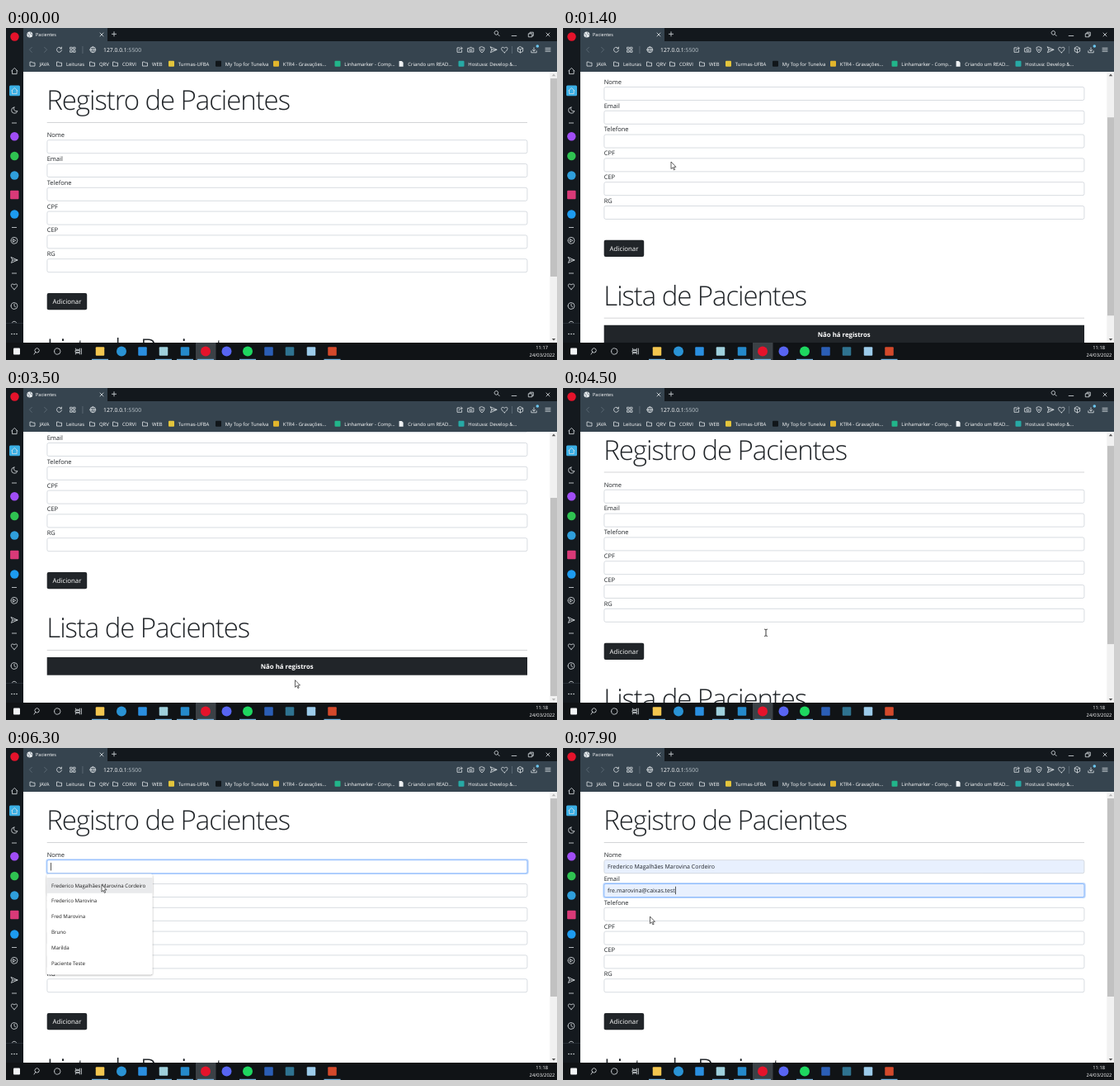
These frames come from a looping animation (668x402 px, 8000 ms). An HTML page:

```html
<!DOCTYPE html>
<html lang="pt-BR">
<head>
<meta charset="utf-8">
<title>Pacientes</title>
<style>
  html, body { margin: 0; width: 100%; height: 100%; overflow: hidden; background: #fff; }
  svg { display: block; width: 668px; height: 402px; }
  text { font-family: "Open Sans", "Noto Sans", sans-serif; text-rendering: geometricPrecision; white-space: pre; }
  .line { fill: none; stroke: #dde2e6; stroke-width: .8; stroke-linecap: round; stroke-linejoin: round; }
  .dim { stroke: #62707b; }
  .title { font-size: 33px; font-weight: 300; letter-spacing: -1.08px; }
  .label { font-size: 7.5px; }
  .value { font-size: 7px; }
  .option { font-size: 6.15px; font-weight: 500; }
  .medium { font-weight: 500; }
</style>
</head>
<body>
<svg id="stage" viewBox="0 0 668 402" xmlns="http://www.w3.org/2000/svg"></svg>
<script>
const LOOP = 8000;
const INK = '#212529';

const rect = (x, y, w, h, fill, extra = '') =>
  `<rect x="${x}" y="${y}" width="${w}" height="${h}" fill="${fill}" ${extra}/>`;
const disc = (x, y, r, fill) => `<circle cx="${x}" cy="${y}" r="${r}" fill="${fill}"/>`;
const square = (x, y, size, fill) => rect(x - size / 2, y - size / 2, size, size, fill, 'rx="1"');
const text = (x, y, str, size, fill, extra = '') =>
  `<text x="${x}" y="${y}" fill="${fill}" style="${size ? `font-size:${size}px` : ''}" ${extra}>${str}</text>`;
const icon = (x, y, d, extra = '') =>
  `<path class="line ${extra}" transform="translate(${x} ${y})" d="${d}"/>`;

const ring = r => `M${-r} 0a${r} ${r} 0 1 0 ${2 * r} 0a${r} ${r} 0 1 0 ${-2 * r} 0`;
const SHAPES = {
  house: 'M-3.6 0L0 -3.6L3.6 0M-2.8 -.6V3.6H2.8V-.6',
  moon: 'M-.4 -3.6A3.7 3.7 0 1 0 3.6 1A3.2 3.2 0 0 1 -.4 -3.6',
  send: 'M-3.6 -3.4L4 0L-3.6 3.4L-2.2 0ZM-2.2 0H4',
  heart: 'M0 3.4C-6 -.4 -3.8 -5 0 -2C3.8 -5 6 -.4 0 3.4Z',
  clock: ring(3.9) + 'M0 -2.2V.2L1.6 1.2',
  play: ring(3.9) + 'M-1.2 -1.7L1.7 0L-1.2 1.7Z',
  globe: ring(3.4) + 'M-3.4 0H3.4M0 -3.4C-2 -1 -2 1 0 3.4C2 1 2 -1 0 -3.4',
  cross: 'M-2 -2L2 2M2 -2L-2 2',
  lens: 'M1.1 .4a2.3 2.3 0 1 0 -3.4 0a2.3 2.3 0 0 0 3.4 0L3.2 2.6',
  folder: 'M-3 2.4V-2.2H-.6L.3 -1.2H3V2.4Z',
  sheet: 'M-2.4 -3.4H.8L2.6 -1.6V3.4H-2.4Z',
  grid: 'M-3 -3H-.8V-.8H-3ZM.8 -3H3V-.8H.8ZM-3 .8H-.8V3H-3ZM.8 .8H3V3H.8Z',
  reload: 'M2.6 -1.6A3 3 0 1 0 3 .6M2.9 -3.2V-1.3H1',
  cube: 'M0 -3.6L3.2 -1.9V1.9L0 3.6L-3.2 1.9V-1.9ZM-3.2 -1.9L0 -.2L3.2 -1.9M0 -.2V3.6',
  camera: 'M-3.4 -1.9H-1.5L-.9 -2.9H.9L1.5 -1.9H3.4V2.7H-3.4ZM-1.3 .4a1.3 1.3 0 1 0 2.6 0a1.3 1.3 0 1 0 -2.6 0',
  shield: 'M0 -3.5L3 -2.4C3 .6 2 2.5 0 3.5C-2 2.5 -3 .6 -3 -2.4ZM-1 -.8L1 1.2M1 -.8L-1 1.2',
  edit: 'M0 -2.4H-3V3H2.6V.6M-.8 .8C-.6 -1 .8 -1.8 3 -1.8M1.6 -3.2L3.2 -1.8L1.6 -.4',
  download: 'M0 -3V1.2M-1.7 -.4L0 1.3L1.7 -.4M-3.2 1V3H3.2V1',
  menu: 'M-3 -2H3M-3 0H3M-3 2H3',
  tasks: 'M-3.6 -3.4V-2.2H1.6V-3.4M-3.6 3.4V2.2H1.6V3.4M-3.6 -1H1.6V1H-3.6ZM3.4 -3.4V3.4',
};

/* ---------- browser frame ---------- */
function sidebar() {
  const s = SHAPES;
  const rule = y => icon(10, y, 'M-2.6 0H2.6');
  return rect(0, 0, 21, 381, '#14191e') + disc(10.5, 10.5, 5.2, '#e5132b') +
    icon(10.3, 52, s.house) + rect(4, 69.5, 13, 12.8, '#3aaee4', 'rx="1.5"') +
    icon(10.3, 76, s.house) + icon(10.3, 99.5, s.moon) + rule(115) +
    disc(10.3, 131.3, 5.2, '#a04df5') + disc(10.3, 155, 5.2, '#2fc351') +
    disc(10.3, 178.5, 5.2, '#2f9fdc') + square(10.3, 202, 10.4, '#d93a78') +
    disc(10.3, 225.5, 5.2, '#1d9bf0') + rule(241.5) +
    icon(10, 257.3, s.play) + icon(10, 281, s.send) + rule(297) +
    icon(10, 313, s.heart) + icon(10, 336.5, s.clock) +
    icon(10, 357, 'M-2.6 0C-2.4 -2.4 2.4 -2.4 2.6 0') + rect(0, 357, 21, .8, '#2b333a') +
    [7, 10, 13].map(x => disc(x, 370.5, .8, '#e4e8eb')).join('');
}

function topBar() {
  const s = SHAPES;
  const white = '#fff';
  return rect(21, 0, 647, 17, '#13181d') + rect(21, 0, 102, 18, '#36444f') +
    rect(21, 16, 647, 37, '#36444f') +
    disc(28.8, 8, 3.5, '#e9edf0') + icon(28.8, 8, 'M-3 -1C-1 -2 0 1 -1 3M1 -3C0 -1 2 0 3 .5', 'dim') +
    text(36, 10.2, 'Pacientes', 5.6, white, 'class="medium"') + icon(116, 8, s.cross) +
    icon(131, 7.3, 'M-2.6 0H2.6M0 -2.6V2.6') +
    icon(595, 7, s.lens) + icon(616, 9.5, 'M-2.8 0H2.8') +
    icon(636.5, 8, 'M-2.8 -1.2H1.4V2.8H-2.8ZM-1.4 -1.2V-2.8H2.8V1.4H1.4') + icon(657, 8, s.cross) +
    icon(30, 26.3, 'M1.4 -3L-1.6 0L1.4 3', 'dim') + icon(48, 26.3, 'M-1.4 -3L1.6 0L-1.4 3', 'dim') +
    icon(64.5, 26.3, s.reload) + icon(81, 26.3, s.grid) + rect(92.6, 22, .7, 9, '#66747e') +
    icon(105.3, 26.3, s.globe) +
    text(118, 28.8, '127.0.0.1<tspan fill="#bcc5cc">:5500</tspan>', 6.8, white, 'class="medium"') +
    icon(550, 26.3, s.edit) + icon(563.5, 26.3, s.camera) + icon(577, 26.3, s.shield) +
    icon(591, 26.3, s.send) + icon(604.3, 26.3, s.heart) + rect(613, 22, .7, 9, '#66747e') +
    icon(623.5, 26.3, s.cube) + icon(640, 26.8, s.download) + disc(644.3, 22, 1.8, '#6bc8f2') +
    icon(657, 26.3, s.menu);
}

function bookmarks() {
  const folders = [[32, 'JAVA'], [64.5, 'Leituras'], [104.5, 'QRV'], [132.5, 'CORVI'], [168.5, 'WEB']];
  const links = [
    [200.5, '#e3c53c', 'Turmas-UFBA'], [257.5, '#11161a', 'My Top for Tunelva'],
    [327.5, '#e2b52c', 'KTR4 - Gravações...'], [402, '#22b58a', 'Linhamarker - Comp...'],
    [479, '', 'Criando um READ...'], [552, '#27a9a5', 'Hostuva: Develop &amp;...'],
  ];
  const name = (x, str) => text(x, 45.6, str, 5.95, '#fff', 'class="medium"');
  return folders.map(([x, str]) => icon(x, 43.3, SHAPES.folder) + name(x + 8.4, str)).join('') +
    links.map(([x, color, str]) =>
      (color ? square(x, 43.3, 7, color)
             : `<path transform="translate(${x} 43.3)" fill="#eef1f3" d="${SHAPES.sheet}"/>`) +
      name(x + 8.3, str)).join('');
}

function taskbar() {
  const y = 391.5;
  const apps = [
    [114, square, '#f3c64f', 1], [140, disc, '#2a93d5'], [165.5, square, '#2a8fe0'],
    [191, square, '#9fd0dc', 1], [217, square, '#2489ca', 1], [242, disc, '#e5132b', 1],
    [267.5, disc, '#5865f2'], [293, disc, '#1ed760', 1], [318.5, square, '#2b5eb5'],
    [344, square, '#2f7390'], [370, square, '#9ccbea'], [395.5, square, '#d3492b', 1],
  ];
  return rect(0, 381, 668, 21, '#101316') + rect(230, 381, 24.5, 21, '#3b4146') +
    square(13, y, 8, '#f2f4f6') + icon(38, y, 'M1.6 .8a2.7 2.7 0 1 0 -4 0M1.6 .8a2.7 2.7 0 0 1 -4 0M-2.2 .9L-4 3.6') +
    icon(62.3, y, ring(3.7)) + icon(88, y, SHAPES.tasks) +
    apps.map(([x, shape, color, open]) =>
      shape(x, y, shape === disc ? 6 : 10.5, color) +
      (open ? rect(x - 10, 400.8, 20, 1.2, '#78b5de') : '')).join('') +
    text(649.7, 388.8, '11:17', 5.8, '#fff', 'id="time" class="medium" text-anchor="middle"') +
    text(650, 398.2, '24/03/2022', 5.8, '#fff', 'class="medium" text-anchor="middle"');
}

/* ---------- page ---------- */
const STEP = 28.8;
const LABELS = ['Nome', 'Email', 'Telefone', 'CPF', 'CEP', 'RG'];
const inputTop = i => 135.7 + STEP * i;
const NAMES = ['Frederico Magalhães Marovina Cordeiro', 'Frederico Marovina', 'Fred Marovina',
  'Bruno', 'Marilda', 'Paciente Teste'];
const EMAILS = ['fre.marovina@caixas.test', 'fr.marovina@caixas.test', 'fre.fmarovina@mail.test',
  'bruno@mail.test', 'marilda@mail.test', 'conta@registo.test'];

function field(label, i) {
  const y = inputTop(i);
  return text(49.7, y - 3.6, label, 0, INK, 'class="label"') +
    rect(48.4, y - 1.4, 585.2, 18.8, '#b9d4fb', `id="glow${i}" rx="3" visibility="hidden"`) +
    rect(49.9, y, 582, 16, '#fff', `id="box${i}" rx="2" stroke="#ced4da" stroke-width=".8"`) +
    text(54, y + 10.7, '', 0, INK, `id="value${i}" class="value"`);
}

function heading(y, label) {
  return text(49.3, y, label, 0, INK, 'class="title"') + rect(49.7, y + 15, 582.3, .8, '#c9cbcd');
}

function page() {
  return '<g id="page">' + heading(99, 'Registro de Pacientes') + LABELS.map(field).join('') +
    rect(49.7, 321.1, 48.5, 20.2, INK, 'rx="2"') +
    text(74, 334.1, 'Adicionar', 7.9, '#fff', 'class="medium" text-anchor="middle"') +
    heading(400, 'Lista de Pacientes') + rect(49.7, 424, 582.3, 21.7, INK) +
    text(340.7, 438, 'Não há registros', 7.8, '#fff', 'text-anchor="middle" font-weight="700"') +
    rect(0, 0, .7, 9.5, '#111', 'id="caret"') + '</g>';
}

function menu(id, i, width, options) {
  const top = inputTop(i) + 16.7;
  return `<g id="${id}" filter="url(#shadow)">` + rect(49.5, top, width, 121.8, '#fff', 'rx="2"') +
    rect(49.5, top + 4.6, width, 18.8, '#e9eaec', `id="${id}Hover"`) +
    options.map((o, k) => text(55, top + 16.2 + 18.8 * k, o, 0, '#1c1c1c', 'class="option"')).join('') + '</g>';
}

function scrollbar() {
  return rect(659.3, 53, 8.7, 328, '#f1f1f1') + rect(660, 61, 8, 240, '#c1c1c1', 'id="thumb"') +
    '<path id="up" d="M661.8 58.2L664 55.6L666.2 58.2Z"/><path id="down" d="M661.8 376L664 378.6L666.2 376Z"/>';
}

const pointer =
  '<path id="arrow" d="M0 0V8.6L2 6.8L3.4 9.9L4.7 9.3L3.3 6.3H6Z" fill="#fff" stroke="#222" stroke-width=".7"/>' +
  '<path id="beam" d="M-1.9 -4.2Q0 -4.2 0 -3.2Q0 -4.2 1.9 -4.2M0 -3.2V3.2M-1.9 4.2Q0 4.2 0 3.2Q0 4.2 1.9 4.2" fill="none" stroke="#222" stroke-width=".9"/>';

document.getElementById('stage').innerHTML =
  '<defs><clipPath id="view"><rect x="21" y="53" width="638.3" height="328"/></clipPath>' +
  '<filter id="shadow" x="-10%" y="-10%" width="120%" height="120%">' +
  '<feDropShadow dx="0" dy=".8" stdDeviation="1.1" flood-opacity=".4"/></filter></defs>' +
  rect(0, 0, 668, 402, '#fff') +
  '<g clip-path="url(#view)">' + page() + menu('nameMenu', 0, 128, NAMES) + menu('mailMenu', 1, 99.7, EMAILS) + '</g>' +
  scrollbar() + topBar() + bookmarks() + sidebar() + taskbar() + pointer;

/* ---------- motion ---------- */
const SCROLL = [[1050, 0], [1200, 24], [1400, 64], [1500, 87], [1600, 98],
  [4150, 98], [4300, 66], [4400, 36], [4500, 12.5], [4600, 3], [4700, 0]];
const PATH = [[100, 62, 30], [500, 84, 75], [950, 131, 162], [1750, 131, 162], [2250, 215, 270],
  [2650, 338, 345], [3000, 388, 342], [3500, 350.5, 353.7], [3700, 350, 352], [4150, 246, 296.3],
  [4750, 246, 296.3], [5650, 129.7, 150.5], [5950, 129.7, 148], [6200, 116, 165], [6400, 116, 166],
  [6650, 124, 174], [7100, 124, 174], [7350, 101, 193], [7600, 102, 196], [7850, 105.5, 204]];
const CLOCK = 600, FOCUS_NAME = 5950, PICK_NAME = 6400, FOCUS_MAIL = 6700, PICK_MAIL = 7600;

const smooth = u => u * u * (3 - 2 * u);

function sample(track, t, col, ease = u => u) {
  if (t <= track[0][0]) return track[0][col];
  const k = track.findIndex(row => row[0] > t);
  if (k < 0) return track[track.length - 1][col];
  const a = track[k - 1], b = track[k];
  return a[col] + (b[col] - a[col]) * ease((t - a[0]) / (b[0] - a[0]));
}

const $ = id => document.getElementById(id);
const within = (t, a, b) => t >= a && t < b;
const set = (id, attrs) => Object.entries(attrs).forEach(([k, v]) => $(id).setAttribute(k, v));
const show = (id, on) => set(id, { visibility: on ? 'visible' : 'hidden' });
const write = (id, str) => { if ($(id).textContent !== str) $(id).textContent = str; };

// The pointer keeps its shape while the page scrolls under it.
function isBeam(t, x, y, scroll) {
  if (within(t, 1000, 1750) || within(t, FOCUS_NAME + 100, PICK_NAME) || t > 7150) return false;
  if (within(t, 4150, 4800)) return true;
  return x > 50 && x < 632 && LABELS.some((_, i) => within(y + scroll, inputTop(i), inputTop(i) + 16.3));
}

function drawFields(t) {
  const values = [t >= PICK_NAME ? NAMES[0] : '', t >= PICK_MAIL ? EMAILS[0] : ''];
  const focus = t < FOCUS_NAME ? -1 : t < FOCUS_MAIL ? 0 : 1;
  values.forEach((v, i) => {
    write('value' + i, v);
    show('glow' + i, focus === i);
    set('box' + i, { fill: v ? '#e8f0fe' : '#fff', stroke: focus === i ? '#86b7fe' : '#ced4da' });
  });
  const since = t - [FOCUS_NAME, PICK_NAME, FOCUS_MAIL, PICK_MAIL].filter(e => e <= t).pop();
  show('caret', focus >= 0 && since % 1000 < 500);
  if (focus >= 0) {
    const end = values[focus] ? $('value' + focus).getComputedTextLength() : 0;
    set('caret', { x: 54.2 + end, y: inputTop(focus) + 3.2 });
  }
}

function draw(t) {
  const scroll = sample(SCROLL, t, 1);
  const x = sample(PATH, t, 1, smooth), y = sample(PATH, t, 2, smooth);
  set('page', { transform: `translate(0 ${-scroll})` });
  set('thumb', { y: 61 + scroll * .735 });
  set('up', { fill: scroll > 0 ? '#505050' : '#b5b5b5' });
  set('down', { fill: scroll < 98 ? '#505050' : '#b5b5b5' });
  drawFields(t);
  show('nameMenu', within(t, FOCUS_NAME + 50, PICK_NAME));
  show('mailMenu', within(t, FOCUS_MAIL + 50, PICK_MAIL));
  show('nameMenuHover', within(t, 6150, PICK_NAME));
  show('mailMenuHover', within(t, 7280, PICK_MAIL));
  const beam = isBeam(t, x, y, scroll);
  show('arrow', t >= 100 && !beam);
  show('beam', t >= 100 && beam);
  set(beam ? 'beam' : 'arrow', { transform: `translate(${x} ${y})` });
  write('time', t < CLOCK ? '11:17' : '11:18');
}

const start = performance.now();
function tick() {
  draw((performance.now() - start) % LOOP);
  requestAnimationFrame(tick);
}
tick();
</script>
</body>
</html>
```
